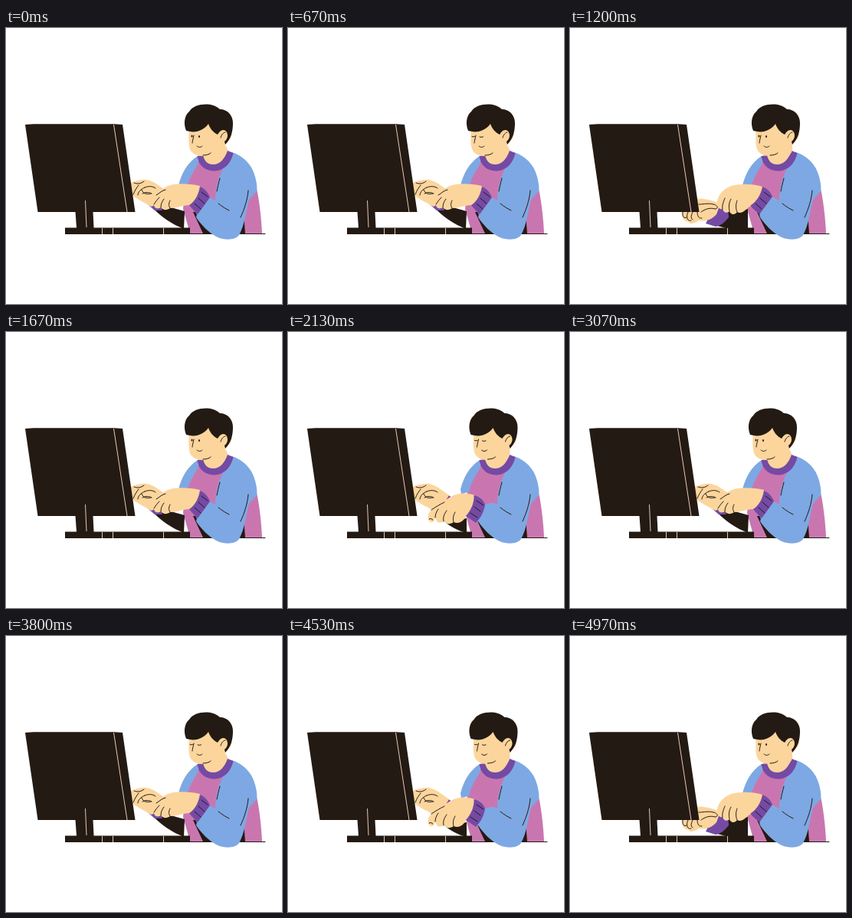
An HTML page for the animation above (5000 ms loop, 360 by 360 pixels).

```html
<!DOCTYPE html>
<html lang="en">
<head>
<meta charset="utf-8">
<title>Typing at a desk</title>
<style>
  html, body { margin: 0; width: 100%; height: 100%; overflow: hidden; background: #fff; }
  svg { display: block; width: 100vw; height: 100vh; }
  .ink { fill: #231a13; }
  .skin { fill: #fcd59d; }
  .blue { fill: #7ea8e3; }
  .pink { fill: #c976b0; }
  .purple { fill: #744aa4; }
  .line { fill: none; stroke: #231a13; stroke-width: 1; stroke-linecap: round; stroke-linejoin: round; }
  .seam { fill: none; stroke: #e9c8b4; stroke-width: 1; }
</style>
</head>
<body>
<svg viewBox="0 0 360 360">
  <path class="line" d="M238 268.500H338"/>

  <!-- torso -->
  <path class="pink" d="M252 172C242 180 236 192 234 206L231 236L240 268H334C333 246 330 222 326 205L294 168Z"/>
  <path class="ink" d="M244 240L257 268H270C259 260 252 250 247 240Z"/>
  <path class="ink" d="M311 231C310 244 311 256 312 268H302Z"/>
  <path class="blue" d="M250 167C236 176 229 190 225 205L226 212L236 208C239 196 244 188 251 177Z"/>

  <g id="far"></g>

  <!-- near sleeve, neck and collar -->
  <path class="blue" id="sleeve"/>
  <path class="line" d="M316 212C315 224 311 236 306 247M277 229C282 233 287 236 291 238M279 196C277 203 276 208 275 213"/>
  <path class="skin" d="M256 162V170C260 183 283 183 291 163L287 154H262Z"/>
  <path class="purple" d="M249.500 167C251 181 262 187 273 186.500C286 185.500 294 175 296.500 163L289 160C285 171 279 178 270 178C263 178 259 174 257 166Z"/>

  <g id="head">
    <path class="skin" d="M239 130C238 141 238 151 240 158C243 165 250 167 257 167H280C284 165 286 161 286 157V150C297 145 297 132 288 130L282 112H246Z"/>
    <path class="ink" d="M235 134C231 124 233 114 239 109C243 102 253 99 263 99.500C270 100 276 103 279 106C289 106 296 114 296 124C296 136 293 145 286 152L285 148C291 144 290 134 284 133C280 133 278 136 276 139C270 136 266 131 264 125C259 132 249 137 240 135Z"/>
    <path class="line" d="M280 143C281 139 284 136 286 136M245 140C244 145 243 148 243 150M249 154C251 156 254 156 256 154M257 166C261 166 265 165 267 163"/>
    <g id="open" class="ink"><ellipse cx="242.500" cy="141" rx="1" ry="1.500"/><ellipse cx="252" cy="141.500" rx="1" ry="1.500"/></g>
    <path id="closed" class="line" d="M240 141.500Q242 142.500 243.500 141.500M250 142Q252 143 254.500 142"/>
  </g>

  <g id="near"></g>

  <!-- computer -->
  <path class="ink" d="M25 126L36 125.200H141L152 126L168.500 240H113.500L114.500 260.500H240V269H77V260.500H92L90.500 240H41.500Z"/>
  <path class="seam" d="M140.500 126L158 240M103.500 225L105 260M125.500 261V269M139.500 261V269M205.500 261V269"/>
</svg>
<script>
const LOOP = 5000, CYCLE = 790;
const $ = id => document.getElementById(id);
const path = (cls, d) => `<path class="${cls}" d="${d}"/>`;

const farRaised = (shadow, cuff) =>
  path('ink', shadow) + path('purple', cuff) +
  path('skin', 'M160 203C168 200 176 197 184 198C193 200 202 207 210 213L202 226L190 233C180 228 170 222 160 216Z') +
  path('line', 'M167 202C172 204 176 203 180 200M166 217C168 212 170 209 173 205M172 218C172 214 176 210 181 208M181 208C186 206 191 206 195 209M178 216C181 214 187 214 190 216M177 211C179 217 184 217 189 216');

const poses = {
  up: {
    head: 0,
    wrist: 'L249 243L265 220',
    far: farRaised('M188 231L215 234L233 239L232 262C217 256 202 247 188 231Z',
                   'M177 223L200 228L204 238L194 238Z'),
    near: path('skin', 'M253 206C239 203 222 202 211 206C204 209 201 214 196 218C190 221 185 225 184 229C184 233 190 232 193 230C193 235 197 237 202 234C205 238 210 238 214 235C223 235 231 231 239 231L250 235Z') +
      path('purple', 'M253 207C259 209 264 215 266 221L250 243C247 240 242 235 239 231C247 226 251 217 253 207Z') +
      path('line', 'M200 221C197 224 195 227 193 230M206 223C203 227 202 230 202 234M214 225C212 229 212 232 214 235M196 218C201 215 203 212 208 211M255 214L263 220M251 222L259 229M246 229L254 236')
  },
  farTap: {
    head: 4,
    wrist: 'L247 243L264 220',
    far: path('ink', 'M202 240L232 236L232 262H207L192 258Z') +
      path('purple', 'M190 229L206 233L207 247C202 253 197 258 190 259L177 255Z') +
      path('skin', 'M146 236C154 225 165 221 175 223C183 224 190 226 196 230L191 243C185 250 176 253 168 251C162 255 157 257 155 253C149 252 145 248 146 240Z') +
      path('line', 'M147 240C146 246 149 249 152 247M154 240C151 246 153 253 158 251M160 240C157 246 158 249 160 250M166 240C166 245 168 249 172 248M168 230C175 230 181 228 187 230C193 231 194 236 189 236C183 234 176 236 171 240'),
    near: path('skin', 'M251 207C238 203 222 203 210 206C200 210 194 217 192 225C191 232 194 237 199 236C200 241 205 242 208 239C210 244 215 244 218 240C224 243 228 238 234 233L248 235Z') +
      path('purple', 'M251 207C257 209 262 214 264 220L247 243C244 240 239 236 235 232C244 226 249 217 251 207Z') +
      path('line', 'M202 222C200 227 198 232 199 236M210 223C207 228 207 234 208 239M218 225C216 230 216 236 218 240M253 214L261 220M248 222L256 229M242 229L250 236')
  },
  nearTap: {
    head: 3.5,
    wrist: 'L245 249L257 225',
    far: farRaised('M204 247L233 243V262C221 259 212 254 204 247Z', 'M190 230L208 212L214 216L204 237Z'),
    near: path('skin', 'M244 213C232 209 220 210 212 215C203 221 192 227 186 233C181 239 182 246 186 248C190 249 190 246 192 242C194 249 198 250 203 247C207 251 212 251 216 248C223 251 229 247 232 240L243 242Z') +
      path('purple', 'M242.500 213C249 214 255 219 257 225C256 234 251 243 245 249C241 246 236 243 232 240C239 232 243 223 242.500 213Z') +
      path('line', 'M196 231C193 235 192 239 192 242M207 233C203 238 202 243 203 247M218 235C215 240 215 244 216 248M187 232C193 228 198 225 204 222M184 244Q186 242 189 245M246 220L255 226M243 228L251 234M238 236L247 242')
  }
};

function poseAt(phase) {
  if (phase < 140) return 'up';
  if (phase < 425) return 'farTap';
  return phase < 605 ? 'nearTap' : 'up';
}

// Five steps per 200 ms, with the first one held longest.
function stepTime(t) {
  const part = t % 200;
  return t - part + 40 * [66, 99, 129, 165].filter(edge => part >= edge).length;
}

let shown = '';
function draw(t) {
  const phase = stepTime(t) % CYCLE;
  const name = poseAt(phase);
  const blink = phase >= 425 && phase < 655;
  $('open').style.display = blink ? 'none' : '';
  $('closed').style.display = blink ? '' : 'none';
  if (name === shown) return;
  shown = name;
  const pose = poses[name];
  $('head').setAttribute('transform', `translate(${pose.head} 0)`);
  $('far').innerHTML = pose.far;
  $('near').innerHTML = pose.near;
  $('sleeve').setAttribute('d', 'M294 162C309 166 321 178 325 194C327 202 328 208 327 213L317 224C313 240 311 258 304 270C299 277 286 277 276 273C264 267 254 256 248 247' +
    pose.wrist + 'C267 222 270 223 273 225C273 208 277 193 287 176Z');
}

let start;
function frame(now) {
  start ??= now;
  draw((now - start) % LOOP);
  requestAnimationFrame(frame);
}
draw(0);
requestAnimationFrame(frame);
</script>
</body>
</html>
```
